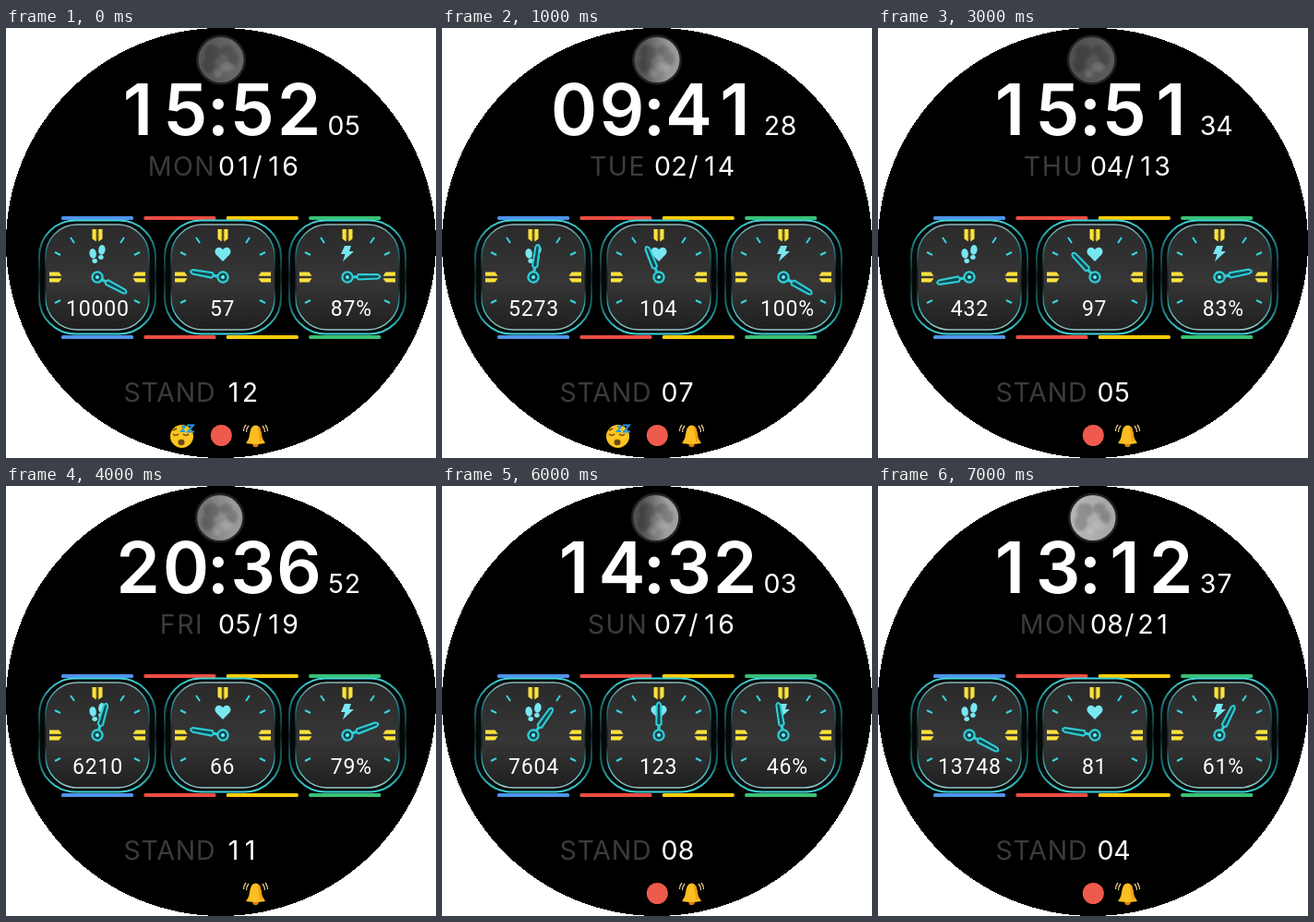
Write an HTML page that moves like this. It is 466x466 px and loops after 8000 ms.

```html
<!DOCTYPE html>
<html lang="en">
<head>
<meta charset="utf-8">
<title>Watch face</title>
<style>
  html, body { margin: 0; width: 100%; height: 100%; overflow: hidden; background: #fff; }
  svg { display: block; width: 100vw; height: 100vh; }
  text { fill: #fff; font: 400 28.5px Inter, sans-serif; text-anchor: middle; }
  .time { font-size: 76.5px; font-weight: 600; }
  .dim { fill: #3b3b3b; }
  .value { font: 400 23px Roboto, sans-serif; letter-spacing: .8px; }
</style>
</head>
<body>
<svg id="face" viewBox="0 0 466 466">
  <defs>
    <linearGradient id="rim" x2="0" y2="1">
      <stop offset="0" stop-color="#3fd3d8"/>
      <stop offset=".22" stop-color="#1b757a"/>
      <stop offset=".5" stop-color="#0c1c1e"/>
      <stop offset=".78" stop-color="#1b757a"/>
      <stop offset="1" stop-color="#3fd3d8"/>
    </linearGradient>
    <linearGradient id="edge" x2="0" y2="1">
      <stop offset="0" stop-color="#8fb5b8"/>
      <stop offset=".2" stop-color="#28898e"/>
      <stop offset=".45" stop-color="#1d2324"/>
      <stop offset=".6" stop-color="#1d2324"/>
      <stop offset=".8" stop-color="#35b6bb"/>
      <stop offset="1" stop-color="#9cc4c6"/>
    </linearGradient>
    <linearGradient id="panel" x2="0" y2="1">
      <stop offset="0" stop-color="#2a2a2b"/>
      <stop offset=".55" stop-color="#363637"/>
      <stop offset="1" stop-color="#1f1f20"/>
    </linearGradient>
    <linearGradient id="phase">
      <stop id="lit" offset=".2"/>
      <stop id="shade" offset=".75"/>
    </linearGradient>
    <filter id="soft"><feGaussianBlur stdDeviation="1.5"/></filter>
    <g id="dial">
      <rect x="-63" y="-61.5" width="126" height="123" rx="39" fill="#050808" stroke="url(#rim)" stroke-width="2"/>
      <rect x="-56" y="-57" width="112" height="114" rx="34" fill="url(#panel)" stroke="url(#edge)" stroke-width="1.5"/>
      <path d="M-46-27l6 3M-29-43l4 6M29-43l-4 6M46-27l-6 3M-46 28l6-3M46 28l-6-3" stroke="#35d6de" stroke-width="2"/>
      <g fill="#fbe13c">
        <path id="mark" d="M-5.5-52h4.2v13.5l-4.2-3zM5.5-52h-4.2v13.5l4.2-3z"/>
        <path d="M-1-52h2v12h-2z" fill="#5c5016"/>
        <use href="#mark" transform="rotate(90)"/>
        <use href="#mark" transform="rotate(-90)"/>
      </g>
    </g>
    <g id="hand" stroke="#30cdd6" fill="#12474d">
      <path d="M0-5V-13" stroke-width="3.2"/>
      <path d="M-2.700-12Q0-9 2.700-12L2.200-33Q0-38 -2.200-33Z" stroke-width="2.1"/>
      <circle r="5.6" stroke-width="2.3"/>
      <circle r="2" fill="#5ff0f5" stroke="none"/>
    </g>
    <g id="feet">
      <ellipse cx="-4.800" cy="-25.500" rx="3.700" ry="5.400" transform="rotate(-8 -5 -25)"/>
      <ellipse cx="-2.800" cy="-17.500" rx="2.800" ry="2.400"/>
      <ellipse cx="4.800" cy="-29.500" rx="3.700" ry="5.400" transform="rotate(8 5 -29)"/>
      <ellipse cx="3.900" cy="-21.500" rx="2.800" ry="2.400"/>
    </g>
    <path id="heart" d="M0-17L-7.4-24.5C-11-29 -5-36 0-29.7C5-36 11-29 7.4-24.5Z"/>
    <path id="bolt" d="M-3-34H4L2-28H7L-5-17L-2.5-25H-7Z"/>
  </defs>
  <circle cx="233" cy="233" r="233" shape-rendering="crispEdges"/>
  <g id="moon">
    <circle r="27" fill="#222"/>
    <circle r="24.5" fill="url(#phase)"/>
    <g filter="url(#soft)">
      <g opacity=".2">
        <ellipse cx="-9" cy="-8" rx="9" ry="8"/>
        <ellipse cx="7" cy="-10" rx="7" ry="6"/>
        <ellipse cx="-13" cy="5" rx="7" ry="9"/>
        <ellipse cx="13" cy="-1" rx="6" ry="8"/>
      </g>
      <g fill="#fff" opacity=".14">
        <circle cx="-3" cy="15" r="4"/>
        <ellipse cx="6" cy="8" rx="7" ry="5"/>
      </g>
    </g>
  </g>
  <g id="bars"></g>
  <g id="dials"></g>
  <g id="labels">
    <text class="dim" x="177.500" y="405" letter-spacing=".8">STAND</text>
  </g>
  <g id="sleep">
    <circle cx="190.5" cy="442.5" r="12.5" fill="#fcc51f"/>
    <path d="M181 440q3 3 6 0M192 440q3 3 6 0M181 436l4-2" fill="none" stroke="#6d4716" stroke-width="1.5"/>
    <ellipse cx="190" cy="449" rx="3.5" ry="3.2" fill="#6d4716"/>
    <path d="M190 432h4l-4 5h4M196 430.5h7l-6 7h7" fill="none" stroke="#1e9bea" stroke-width="1.9"/>
  </g>
  <circle id="link" cx="233.3" cy="441.5" r="11.5" fill="#ee5a4b"/>
  <g id="bell">
    <circle cx="270.500" cy="451" r="3.2" fill="#d98208"/>
    <path d="M270.500 430.500C264 430.500 264.500 441 263 445L260 450Q270.500 452 281 450L278 445C276.500 441 277 430.500 270.500 430.500Z" fill="#fdbd23"/>
    <path d="M274 433Q276 440 276.500 448" fill="none" stroke="#f39b13" stroke-width="2.5"/>
    <path d="M263 431q-2.500 3-2.500 7M260 430q-2.500 3-2.500 7M278 431q2.500 3 2.500 7M281 430q2.500 3 2.500 7" fill="none" stroke="#f3d393" stroke-width="1.2"/>
  </g>
</svg>
<script>
const NS = 'http://www.w3.org/2000/svg';
const $ = id => document.getElementById(id);

function add(parent, tag, attrs) {
  const el = document.createElementNS(NS, tag);
  for (const k in attrs) el.setAttribute(k, attrs[k]);
  return parent.appendChild(el);
}

// One text per fixed digit cell
const cells = (xs, y, cls) => xs.map(x => add($('labels'), 'text', { x, y, class: cls }));
const fill = (row, str) => row.forEach((el, i) => { el.textContent = str[i]; });

['#4f93ec', '#ec4d43', '#fccb0a', '#38c174'].forEach((color, i) => {
  for (const y of [204, 333])
    add($('bars'), 'rect', { x: 60 + 89.4 * i, y, width: 78, height: 4, rx: 1.5, fill: color });
});

const dials = [[99, 'feet', 99.4], [235, 'heart', 234.6], [370, 'bolt', 374.4]].map(([x, icon, tx]) => {
  const g = add($('dials'), 'g', { transform: `translate(${x} 270)` });
  add(g, 'use', { href: '#dial' });
  add(g, 'use', { href: '#' + icon, fill: '#78e7f2' });
  const text = add(g, 'text', { class: 'value', x: tx - x, y: 42 });
  return { text, hand: add(g, 'use', { href: '#hand' }) };
});

const time = cells([143, 195, 230, 267.5, 317.5], 115.5, 'time');
const secs = cells([357.5, 375.5], 116, '');
const date = cells([239, 257, 272.5, 290, 308], 160, '');
const stand = cells([246.5, 264.5], 405, '');
const day = add($('labels'), 'text', { x: 190.5, y: 160, class: 'dim', 'letter-spacing': 1.5 });

// time, seconds, day, date, stand, [steps, angle], [pulse, angle], battery, icons, [moon x, left, right]
const looks = [
  ['15:52', '05', 'MON', '01/16', '12', [10000, 118], [57, -80], 87, 'sleep link bell', [233, '#555', '#666']],
  ['09:41', '28', 'TUE', '02/14', '07', [5273, 8], [104, -22], 100, 'sleep link bell', [233, '#555', '#999']],
  ['00:25', '17', 'WED', '03/08', '05', [8377, 118], [158, 78], 2, 'sleep', [233, '#555', '#999']],
  ['15:51', '34', 'THU', '04/13', '05', [432, -100], [97, -43], 83, 'link bell', [231.7, '#505050', '#5a5a5a']],
  ['20:36', '52', 'FRI', '05/19', '11', [6210, 16], [66, -80], 79, 'bell', [231.7, '#777', '#999']],
  ['08:55', '47', 'SAT', '06/24', '02', [4595, 0], [51, -80], 6, '', [231.7, '#b8b8b8', '#adadad']],
  ['14:32', '03', 'SUN', '07/16', '08', [7604, 35], [123, 0], 46, 'link bell', [231.7, '#505050', '#a0a0a0']],
  ['13:12', '37', 'MON', '08/21', '04', [13748, 118], [81, -80], 61, 'link bell', [233, '#b4b4b4', '#a8a8a8']]
];

function show([clock, sec, name, md, hours, steps, pulse, power, icons, [mx, left, right]]) {
  fill(time, clock);
  fill(secs, sec);
  fill(date, md);
  fill(stand, hours);
  day.textContent = name;
  [steps, pulse, [power + '%', (power - 50) * 2.4]].forEach(([value, angle], i) => {
    dials[i].text.textContent = value;
    dials[i].hand.setAttribute('transform', `rotate(${angle})`);
  });
  for (const id of ['sleep', 'link', 'bell'])
    $(id).style.display = icons.includes(id) ? '' : 'none';
  $('moon').setAttribute('transform', `translate(${mx} 34.5)`);
  $('lit').setAttribute('stop-color', left);
  $('shade').setAttribute('stop-color', right);
}

let current = 0;
show(looks[0]);
const start = performance.now();
function tick(now) {
  const next = Math.floor(Math.max(0, now - start) / 1000) % looks.length;
  if (next !== current) show(looks[current = next]);
  requestAnimationFrame(tick);
}
requestAnimationFrame(tick);
</script>
</body>
</html>
```
